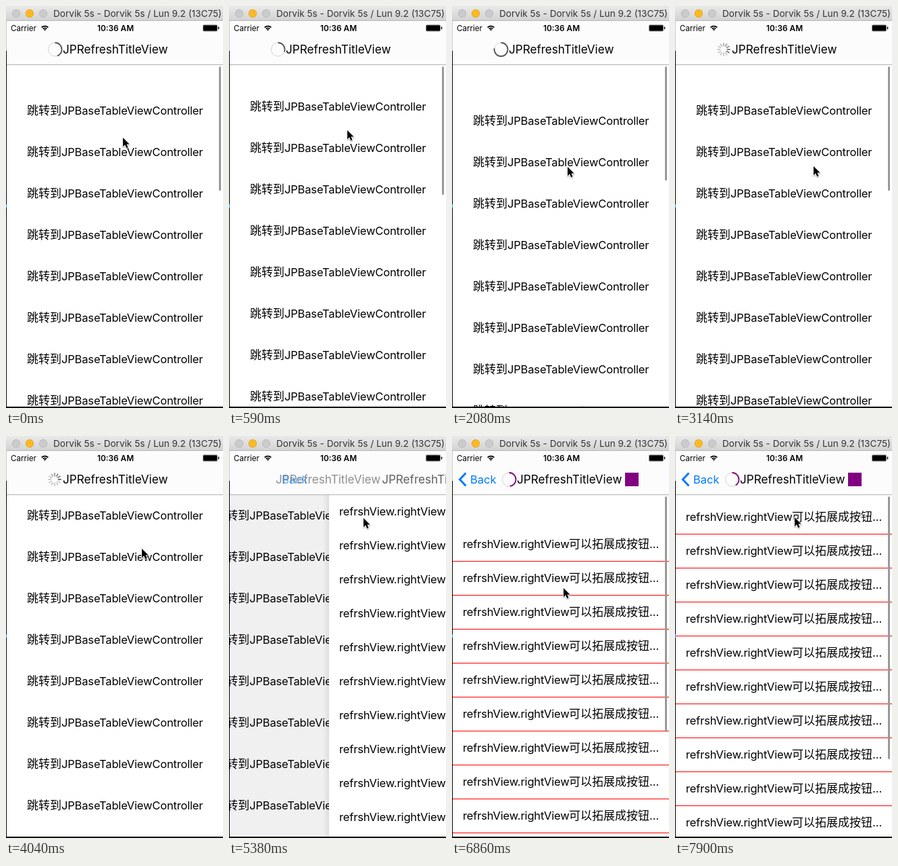
Recreate the animation shown at these times as an HTML page with a canvas. Size 321 by 592 pixels, loop 8000 ms.

```html
<!DOCTYPE html>
<html lang="en">
<head>
<meta charset="utf-8">
<title>Pull to refresh</title>
<style>
html, body { margin: 0; width: 321px; height: 592px; overflow: hidden; background: #fff; }
canvas { display: block; }
</style>
</head>
<body>
<canvas id="stage" width="321" height="592"></canvas>
<script>
const c = document.getElementById('stage').getContext('2d');
const LOOP = 8000, TICK = 149, TOP = 87, W = 320, TAU = Math.PI * 2;
const RELEASE = 2870, LOADED = 4930, PUSH = 5364;
const LATIN = 'Inter, "Noto Sans CJK SC", sans-serif';
const CJK = '17px "Noto Sans CJK SC", "Noto Sans CJK", sans-serif';
const ROW = '16.5px ' + LATIN, ROW_SPACING = -0.17;
const TITLE = 'JPRefreshTitleView', BLUE = '#007aff', PURPLE = '#800080';

// Pointer stops: time, x, y
const STOPS = [[0, 173, 194], [1490, 179, 163], [2086, 171, 237], [3129, 205, 236],
  [4700, 199, 121], [PUSH, 199, 121], [6854, 165, 224], [7897, 177, 120]];

const clamp = v => Math.max(0, Math.min(1, v));
const smooth = v => (1 - Math.cos(Math.PI * clamp(v))) / 2;
const slowing = v => Math.sin(Math.PI / 2 * clamp(v));

function glide(t, from, to, a, b, ease = smooth) {
  return a + (b - a) * ease((t - from) / (to - from));
}

function pullA(t) {
  if (t < 1490) return glide(t, 0, 1490, 37, 19);
  if (t < RELEASE) return glide(t, 1490, 2700, 19, 66, slowing);
  return glide(t, RELEASE, RELEASE + 560, 66, 0);
}

function pullB(t) {
  return t < 6854 ? glide(t, 5900, 6854, 0, 48) : glide(t, 6854, 7897, 48, 8);
}

function pushAt(t) {
  if (t < PUSH) return 0;
  const p = 1 - 0.46 * Math.exp((PUSH - t) / 80);
  return p > 0.98 ? 1 : p;
}

function rect(x, y, w, h, color) {
  c.fillStyle = color;
  c.fillRect(x, y, w, h);
}

function round(x, y, w, h, r, color) {
  c.fillStyle = color;
  c.beginPath();
  c.roundRect(x, y, w, h, r);
  c.fill();
}

function text(s, x, y, font, color = '#000', spacing = 0) {
  c.font = font;
  c.letterSpacing = spacing + 'px';
  c.fillStyle = color;
  c.fillText(s, x, y);
}

function arc(x, y, r, from, to, width, color) {
  c.strokeStyle = color;
  c.lineWidth = width;
  c.beginPath();
  c.arc(x, y, r, from, to);
  c.stroke();
}

function faded(alpha, draw) {
  c.save();
  c.globalAlpha = clamp(alpha);
  draw();
  c.restore();
}

function ring(x, part, color) {
  arc(x, 64, 10, 0, TAU, 1, '#d4d4d4');
  arc(x, 64, 10, -TAU / 4, -TAU / 4 + TAU * clamp(part), 1.8, color);
}

function spinner(t) {
  const lead = Math.floor(t / 1000 * 12);
  c.lineWidth = 2;
  c.lineCap = 'round';
  for (let i = 0; i < 12; i++) {
    const age = (lead - i + 12) % 12, a = i * TAU / 12;
    c.strokeStyle = `rgba(90,90,90,${Math.max(0.3, 0.85 - age * 0.1)})`;
    c.beginPath();
    c.moveTo(72 + 5.5 * Math.cos(a), 64 + 5.5 * Math.sin(a));
    c.lineTo(72 + 9 * Math.cos(a), 64 + 9 * Math.sin(a));
    c.stroke();
  }
  c.lineCap = 'butt';
}

function scrollbar(length, alpha) {
  faded(alpha, () => round(315, 89, 3, length, 1.5, '#999'));
}

function listA(t, push) {
  const pull = Math.round(pullA(t)), x = -0.3 * W * push;
  rect(0, TOP, 321, 505, '#fff');
  for (let y = TOP + 36 + pull; y < 610; y += 61) {
    text('跳转到', 31 + x, y, CJK);
    text('JPBaseTableViewController', 82 + x, y, ROW, '#000', ROW_SPACING);
  }
  scrollbar(220 - pull, (4000 - t) / 300);
  rect(0, TOP, 321, 505, `rgba(0,0,0,${0.11 * push})`);
}

function listB(t, push) {
  const pull = Math.round(pullB(t)), x = Math.round(W * (1 - push));
  if (push < 1) {
    const shade = c.createLinearGradient(x - 8, 0, x + 1, 0);
    shade.addColorStop(0, 'rgba(0,0,0,0)');
    shade.addColorStop(1, 'rgba(0,0,0,.08)');
    rect(x - 8, TOP, 9, 505, shade);
  }
  rect(x + 1, TOP, 321, 505, '#fff');
  for (let y = TOP + pull; y < 592; y += 50) {
    text('refrshView.rightView', x + 16, y + 30, ROW, '#000', ROW_SPACING);
    text('可以拓展成按钮', x + 173, y + 30, CJK);
    text('...', x + 292, y + 30, ROW);
    if (push === 1) rect(0, y + 49, 321, 1, '#f00');
  }
  if (pull > 0) scrollbar(395 - pull, 1);
}

function navBar(t, push) {
  const font = '17.1px ' + LATIN, rest = 1 - push;
  rect(0, 22, 321, 64, '#fcfcfc');
  rect(0, 86, 321, 1, '#b2b2b2');
  faded(1 - push * 1.05, () => text(TITLE, 84 - 28 * push, 70, font));
  if (push === 0) {
    if (t < RELEASE) ring(72.5, (pullA(t) - 17) / 45, '#555');
    else if (t < LOADED) spinner(t);
    return;
  }
  faded(push * 1.15, () => {
    text(TITLE, 96 + 283 * rest, 70, font);
    rect(256 + 283 * rest, 54, 20, 20, PURPLE);
    text('Back', 27 + 111 * rest, 70, '16.5px ' + LATIN, BLUE);
  });
  faded(3 * push - 2, () => {
    c.strokeStyle = BLUE;
    c.lineWidth = 3;
    c.beginPath();
    c.moveTo(20.5, 54.5);
    c.lineTo(11.5, 64);
    c.lineTo(20.5, 73.5);
    c.stroke();
  });
  const pull = pullB(t);
  if (pull > 0) ring(84.5, Math.min(pull / 10, 0.4 + pull / 600), PURPLE);
}

function statusBar() {
  text('Carrier', 7, 36.5, '11.6px ' + LATIN);
  text('10:36 AM', 135, 36.5, '600 11.8px ' + LATIN);
  for (const r of [1.2, 4, 6.9]) arc(57.5, 36.5, r, -TAU * 3 / 8, -TAU / 8, r < 2 ? 2.4 : 1.7, '#000');
  round(291, 27.5, 22, 10, 2, '#888');
  round(292, 28.5, 20, 8, 1, '#000');
  round(313.8, 30.5, 1.4, 4, 0.7, '#000');
}

function windowFrame() {
  const bar = c.createLinearGradient(0, 0, 0, 22);
  bar.addColorStop(0, '#e9e9e9');
  bar.addColorStop(1, '#d2d2d2');
  rect(0, 0, 321, 22, bar);
  rect(0, 21, 321, 1, '#b8b8b8');
  for (let x = 15; x < 60; x += 20) {
    round(x - 6, 5, 12, 12, 6, x === 35 ? '#fdb924' : '#cbcbcb');
    arc(x, 11, 5.7, 0, TAU, 0.7, x === 35 ? '#dfa023' : '#b4b4b4');
  }
  text('Dorvik 5s - Dorvik 5s / Lun 9.2 (13C75)', 70, 16, '13.6px ' + LATIN, '#333');
  rect(0, 22, 1, 44, '#c8c8c8');
  rect(0, 66, 1, 526, '#000');
  rect(0, 292, 1, 5, '#1ea0e6');
  rect(0, 590, 321, 2, '#000');
}

function pointer(t) {
  const i = Math.max(1, STOPS.findIndex(s => s[0] > t)), n = t >= STOPS.at(-1)[0] ? STOPS.length - 1 : i;
  const a = STOPS[n - 1], b = STOPS[n];
  const [x, y] = [1, 2].map(k => Math.round(glide(t, a[0], b[0], a[k], b[k])));
  c.save();
  c.translate(x, y);
  c.scale(0.94, 0.94);
  c.lineWidth = 1.8;
  c.lineJoin = 'round';
  c.strokeStyle = '#fff';
  c.shadowColor = 'rgba(0,0,0,.35)';
  c.shadowBlur = 2;
  c.shadowOffsetY = 1;
  const shape = new Path2D('M0 0V14L3.2 11L5.6 16.2L8 15.2L5.8 10.2H10.2Z');
  c.stroke(shape);
  c.shadowColor = 'transparent';
  c.fillStyle = '#000';
  c.fill(shape);
  c.restore();
}

function draw(now) {
  const t = Math.floor((now % LOOP + 20) / TICK) * TICK, push = pushAt(t);
  if (push < 1) listA(t, push);
  if (push > 0) listB(t, push);
  navBar(t, push);
  statusBar();
  windowFrame();
  pointer(t);
}

let begin;
function loop(now) {
  begin ??= now;
  draw(Math.max(0, now - begin));
  requestAnimationFrame(loop);
}
requestAnimationFrame(loop);
</script>
</body>
</html>
```
